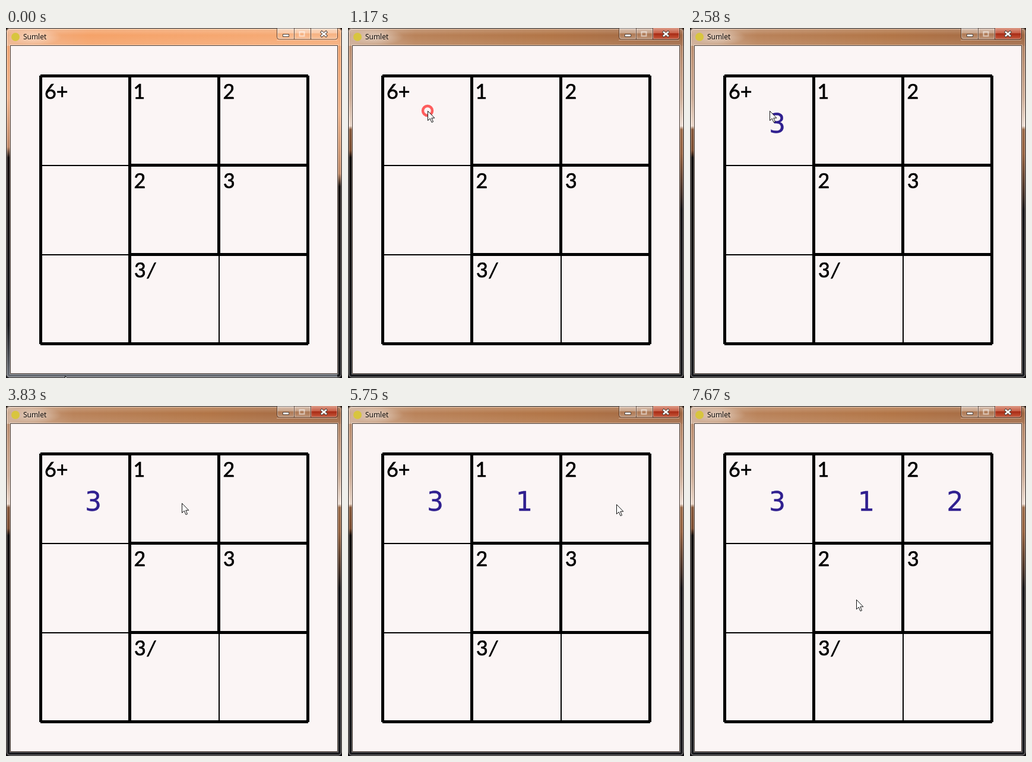
Write an HTML page that moves like this. It is 566 px wide and 588 px high and loops after 8 s.

```html
<!DOCTYPE html>
<html lang="en">
<head>
<meta charset="utf-8">
<title>Sumlet</title>
<style>
html, body { margin: 0; width: 100%; height: 100%; overflow: hidden; background: #0b0b0d; }
svg { display: block; width: 566px; height: 588px; }
.clue { font: 34px Lato, sans-serif; stroke: #000; stroke-width: .7px; }
.answer { font: 44px "DejaVu Sans", sans-serif; fill: #2f1f8f; stroke: #2f1f8f; stroke-width: .4px; }
.title { font: 12px "Open Sans", sans-serif; }
</style>
</head>
<body>
<svg viewBox="0 0 566 588">
  <defs>
    <linearGradient id="idleSide" x2="0" y2="1">
      <stop offset="0" stop-color="#f2a06a"/><stop offset=".2" stop-color="#f0b48c"/>
      <stop offset=".34" stop-color="#c08a68"/><stop offset=".37" stop-color="#15100e"/>
      <stop offset=".85" stop-color="#17181b"/><stop offset="1" stop-color="#6b7078"/>
    </linearGradient>
    <linearGradient id="liveSide" x2="0" y2="1">
      <stop offset="0" stop-color="#b48260"/><stop offset=".2" stop-color="#cfae98"/>
      <stop offset=".28" stop-color="#ecd9cc"/><stop offset=".29" stop-color="#85573a"/>
      <stop offset=".35" stop-color="#7a4c30"/><stop offset=".37" stop-color="#100c0a"/>
      <stop offset="1" stop-color="#1b1c1f"/>
    </linearGradient>
    <linearGradient id="liveRight" x2="0" y2="1">
      <stop offset="0" stop-color="#a87654"/><stop offset=".2" stop-color="#d0b09a"/>
      <stop offset=".28" stop-color="#efe0d6"/><stop offset=".29" stop-color="#9a6a48"/>
      <stop offset=".36" stop-color="#946240"/><stop offset=".48" stop-color="#3a2a22"/>
      <stop offset=".52" stop-color="#141315"/><stop offset="1" stop-color="#1b1c1f"/>
    </linearGradient>
    <linearGradient id="idleBar" x2="1" y2="0">
      <stop offset="0" stop-color="#eeb48e"/><stop offset=".25" stop-color="#f5a268"/>
      <stop offset="1" stop-color="#f6ac78"/>
    </linearGradient>
    <linearGradient id="liveBar" x2="1" y2="0">
      <stop offset="0" stop-color="#cfae96"/><stop offset=".2" stop-color="#b98259"/>
      <stop offset=".6" stop-color="#b27546"/><stop offset="1" stop-color="#a06844"/>
    </linearGradient>
    <linearGradient id="shine" x2="0" y2="1">
      <stop offset="0" stop-color="#fff" stop-opacity=".25"/>
      <stop offset=".4" stop-color="#fff" stop-opacity="0"/>
      <stop offset="1" stop-color="#fff" stop-opacity=".12"/>
    </linearGradient>
    <linearGradient id="glass" x2="0" y2="1">
      <stop offset="0" stop-color="#fff" stop-opacity=".45"/>
      <stop offset=".48" stop-color="#fff" stop-opacity=".3"/>
      <stop offset=".5" stop-color="#fff" stop-opacity=".06"/>
      <stop offset="1" stop-color="#fff" stop-opacity=".25"/>
    </linearGradient>
    <linearGradient id="red" x2="0" y2="1">
      <stop offset="0" stop-color="#dc9a86"/><stop offset=".48" stop-color="#c65a42"/>
      <stop offset=".5" stop-color="#a82c16"/><stop offset="1" stop-color="#c8583a"/>
    </linearGradient>
    <radialGradient id="glow">
      <stop offset="0" stop-color="#fff" stop-opacity=".5"/>
      <stop offset="1" stop-color="#fff" stop-opacity="0"/>
    </radialGradient>
    <clipPath id="frame"><rect width="566" height="588" rx="6"/></clipPath>
  </defs>

  <g clip-path="url(#frame)">
    <rect width="566" height="588" fill="url(#idleSide)"/>
    <rect x="558" width="8" height="720" fill="url(#idleSide)"/>
    <rect width="566" height="30" fill="url(#idleBar)"/>
    <g id="live">
      <rect width="566" height="588" fill="url(#liveSide)"/>
      <rect x="558" width="8" height="588" fill="url(#liveRight)"/>
      <rect width="566" height="30" fill="url(#liveBar)"/>
    </g>
    <rect width="566" height="30" fill="url(#shine)"/>
  </g>
  <rect x=".5" y=".5" width="565" height="587" rx="6" fill="none" stroke="#1c1816"/>
  <rect x="1.5" y="1.5" width="563" height="585" rx="5" fill="none" stroke="#fff" stroke-opacity=".55"/>
  <ellipse cx="48" cy="15" rx="46" ry="14" fill="url(#glow)"/>
  <circle cx="16" cy="15" r="7" fill="#d8c53e"/>
  <text class="title" x="29" y="19">Sumlet</text>

  <g stroke="#4a3022" stroke-opacity=".85" fill="url(#glass)">
    <path d="M456.500 0V15q0 4 4 4H485.500V0M485.500 19H513.500V0H485.500"/>
    <path d="M513.500 0V19H554q4.500 0 4.500-4V0"/>
    <path id="close" d="M513.500 0V19H554q4.500 0 4.500-4V0" fill="url(#red)"/>
  </g>
  <path d="M457.500 1V15q0 3 3 3H484.500V1M486.500 1V18H512.500V1M514.500 1V18H554q3.500 0 3.500-3V1M456 20.500H558" fill="none" stroke="#fff" stroke-opacity=".4"/>
  <rect x="466.500" y="10.500" width="10" height="4" fill="#fff" stroke="#54453c"/>
  <rect x="494.500" y="6.500" width="8" height="7" fill="none" stroke="#fff" stroke-opacity=".55" stroke-width="2"/>
  <path d="M532 7l7 6m0-6l-7 6" stroke="#54453c" stroke-width="4.500" stroke-linecap="square"/>
  <path d="M532 7l7 6m0-6l-7 6" stroke="#fff" stroke-width="2.500" stroke-linecap="square"/>

  <rect x="6.500" y="28.500" width="553" height="553" fill="none" stroke="#fff" stroke-opacity=".4"/>
  <rect x="7.500" y="29.500" width="551" height="551" fill="#fbf5f5" stroke="#4a3c34"/>
  <g fill="none" stroke="#000">
    <path stroke-width="2" d="M58 231H208M58 381H208M359 381V530"/>
    <path stroke-width="5" d="M58 80.500H509M58 530.500H509M58.500 80V531M508.500 80V531M208.500 80V531M358.500 80V381M208 230.500H509M208 380.500H509"/>
  </g>
  <g class="clue">
    <text x="65" y="119">6+</text>
    <text x="214.500" y="119">1</text>
    <text x="365.500" y="119">2</text>
    <text x="215.500" y="269">2</text>
    <text x="366" y="269">3</text>
    <text x="216" y="419">3<tspan dx="2" font-style="italic">/</tspan></text>
  </g>
  <g class="answer">
    <text x="133" y="176" data-at="2580">3</text>
    <text x="283" y="176" data-at="4750">1</text>
    <text x="432.500" y="176" data-at="6330">2</text>
  </g>
  <circle id="ring" fill="none" stroke="#ff2a2a"/>
  <path id="cursor" d="M.5 .5V16.500L4.200 13 7 19.500 9.500 18.500 6.800 12.200H11.800Z" fill="#fff" stroke="#111"/>
</svg>
<script>
const LOOP = 8000, STEP = 1000 / 12, FADE = 480;
const $ = id => document.getElementById(id);
const answers = document.querySelectorAll("[data-at]");
const clamp = v => Math.min(1, Math.max(0, v));

// time, x, y of the pointer tip
const path = [
  [0, 99, 584], [250, 124, 267], [420, 124, 267], [830, 134, 139],
  [3340, 134, 139], [3830, 296, 163], [5420, 296, 163], [5750, 452, 165],
  [7000, 452, 165], [7420, 212, 361], [7670, 280, 325]
];
// press, release, x, y
const clicks = [[995, 1250, 134, 139], [3995, 4084, 296, 163], [5995, 6090, 452, 166]];

function pointer(t) {
  const i = path.findIndex(k => k[0] > t);
  if (i < 0) return path.at(-1).slice(1);
  const [t0, x0, y0] = path[i - 1], [t1, x1, y1] = path[i];
  const p = (t - t0) / (t1 - t0), e = p * p * (3 - 2 * p);
  return [x0 + (x1 - x0) * e, y0 + (y1 - y0) * e];
}

function set(el, attrs) {
  for (const name in attrs) el.setAttribute(name, attrs[name]);
}

function draw(t) {
  set($("cursor"), { transform: `translate(${pointer(t).map(Math.round)})` });

  const active = clamp((t - 960) / 160);
  set($("live"), { opacity: active });
  set($("close"), { opacity: active });

  for (const a of answers) set(a, { visibility: t >= a.dataset.at ? "visible" : "hidden" });

  const click = clicks.find(([down, up]) => t >= down && t < up + FADE);
  set($("ring"), { visibility: click ? "visible" : "hidden" });
  if (click) {
    const [, up, cx, cy] = click, p = clamp((t - up) / FADE);
    set($("ring"), {
      cx, cy, r: 8 + 12 * p, "stroke-width": 4.5 - 2.5 * p, "stroke-opacity": 0.75 * (1 - p)
    });
  }
}

const start = performance.now();
function tick() {
  const t = (performance.now() - start) % LOOP;
  draw(Math.floor((t + 4) / STEP) * STEP + 4);
  requestAnimationFrame(tick);
}
tick();
</script>
</body>
</html>
```
